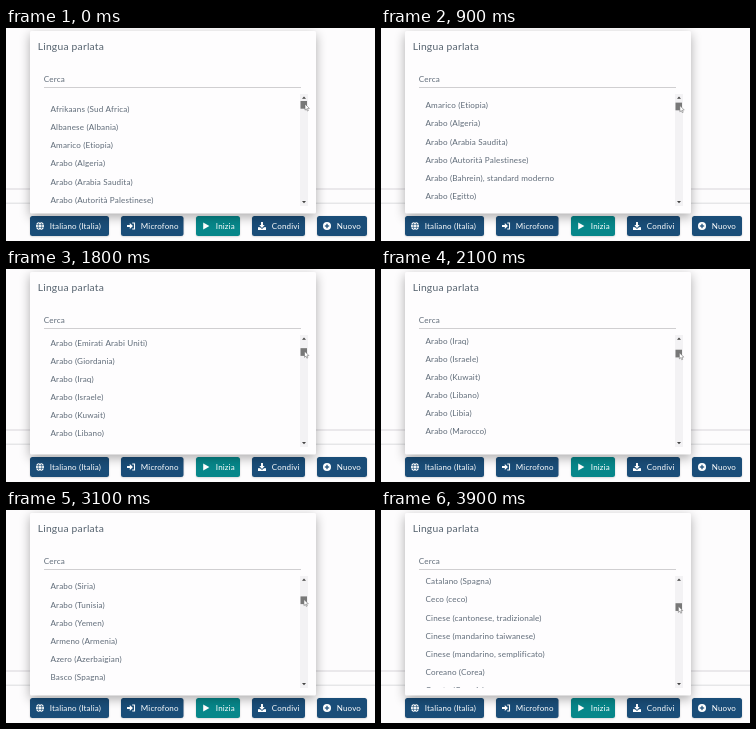
An HTML page with a canvas that plays this animation: 369 by 213 pixels, repeating every 4 s.

```html
<!DOCTYPE html>
<html lang="it">
<head>
<meta charset="utf-8">
<style>
html, body { margin: 0; width: 100%; height: 100%; overflow: hidden; background: #fdfcfd; }
canvas { display: block; }
</style>
</head>
<body>
<canvas id="stage" width="369" height="213"></canvas>
<script>
const ctx = document.getElementById('stage').getContext('2d');
const LOOP = 4000, TICK = 100;
const ROW = 18.13, THUMB_RATIO = 0.0405;
const NAVY = '#1a4d78', TEAL = '#07878a', INK = '#5f6b78';

const languages = [
  'Afrikaans (Sud Africa)', 'Albanese (Albania)', 'Amarico (Etiopia)',
  ...['Algeria', 'Arabia Saudita', 'Autorità Palestinese'].map(arabic),
  'Arabo (Bahrein), standard moderno',
  ...['Egitto', 'Emirati Arabi Uniti', 'Giordania', 'Iraq', 'Israele', 'Kuwait', 'Libano',
    'Libia', 'Marocco', 'Oman', 'Qatar', 'Siria', 'Tunisia', 'Yemen'].map(arabic),
  'Armeno (Armenia)', 'Azero (Azerbaigian)', 'Basco (Spagna)', 'Bengalese (India)',
  'Birmano (Myanmar)', 'Bulgaro (Bulgaria)', 'Catalano (Spagna)', 'Ceco (ceco)',
  'Cinese (cantonese, tradizionale)', 'Cinese (mandarino taiwanese)',
  'Cinese (mandarino, semplificato)', 'Coreano (Corea)', 'Croato (Croazia)', 'Danese (Danimarca)'
];

// List position while the thumb is dragged: [time, pixels]
const drag = [[0, 0], [300, 5], [900, 40], [1400, 101.4], [2100, 190.5],
  [2700, 252.3], [3500, 409.6], [3900, 499.2], [4000, 510]];

const buttons = [
  { x: 24, w: 79, label: 'Italiano (Italia)', icon: globe },
  { x: 115, w: 62.5, label: 'Microfono', icon: signIn },
  { x: 190, w: 44, label: 'Inizia', icon: play, color: TEAL },
  { x: 246, w: 53, label: 'Condivi', icon: download },
  { x: 311, w: 50, label: 'Nuovo', icon: plus }
];

function arabic(country) { return `Arabo (${country})`; }

function scrollAt(time) {
  const i = drag.findIndex(([t], k) => k > 0 && time <= t);
  const [t0, a] = drag[i - 1], [t1, b] = drag[i];
  return a + (b - a) * (time - t0) / (t1 - t0);
}

function text(str, x, y, size, color, spacing) {
  ctx.font = `${size}px Lato, sans-serif`;
  ctx.letterSpacing = spacing + 'px';
  ctx.fillStyle = color;
  ctx.fillText(str, x, y);
}

function rect(x, y, w, h, color) {
  ctx.fillStyle = color;
  ctx.fillRect(x, y, w, h);
}

function poly(points, color) {
  ctx.beginPath();
  points.forEach(([x, y]) => ctx.lineTo(x, y));
  ctx.closePath();
  ctx.fillStyle = color;
  ctx.fill();
}

function disc(r) {
  ctx.beginPath();
  ctx.arc(0, 0, r, 0, 7);
  ctx.fillStyle = '#fff';
  ctx.fill();
}

function roundBox(x, y, w, h, r, color, blur, offset, shade) {
  ctx.save();
  ctx.shadowColor = `rgba(0,0,0,${shade})`;
  ctx.shadowBlur = blur;
  ctx.shadowOffsetY = offset;
  ctx.beginPath();
  ctx.roundRect(x, y, w, h, r);
  ctx.fillStyle = color;
  ctx.fill();
  ctx.restore();
}

function globe(color) {
  disc(4);
  ctx.strokeStyle = color;
  ctx.lineWidth = 0.6;
  ctx.beginPath();
  ctx.ellipse(0, 0, 1.8, 4, 0, 0, 7);
  for (const y of [-1.4, 1.4]) {
    ctx.moveTo(-4, y);
    ctx.lineTo(4, y);
  }
  ctx.stroke();
}

function signIn() {
  poly([[-4, -1], [-1.2, -1], [-1.2, -3], [2, 0], [-1.2, 3], [-1.2, 1], [-4, 1]], '#fff');
  ctx.strokeStyle = '#fff';
  ctx.lineWidth = 1.1;
  ctx.beginPath();
  ctx.moveTo(1.2, -3);
  ctx.lineTo(3.5, -3);
  ctx.lineTo(3.5, 3);
  ctx.lineTo(1.2, 3);
  ctx.stroke();
}

function play() {
  poly([[-2.8, -3.6], [3.4, 0], [-2.8, 3.6]], '#fff');
}

function download(color) {
  rect(-4, 1.2, 8, 2.8, '#fff');
  poly([[-3.2, 0], [3.2, 0], [0, 3]], color);
  poly([[-1, -4], [1, -4], [1, -1], [2.7, -1], [0, 2], [-2.7, -1], [-1, -1]], '#fff');
}

function plus(color) {
  disc(4);
  rect(-2.2, -0.6, 4.4, 1.2, color);
  rect(-0.6, -2.2, 1.2, 4.4, color);
}

function drawButton({ x, w, label, icon, color = NAVY }) {
  roundBox(x, 188, w, 20, 2.5, color, 2, 0.5, 0.2);
  ctx.save();
  ctx.translate(x + 10, 198);
  icon(color);
  ctx.restore();
  text(label, x + 19.8, 201, 8, '#fff', 0.15);
}

function drawList(scroll) {
  ctx.save();
  ctx.beginPath();
  ctx.rect(24, 65.5, 270, 112.5);
  ctx.clip();
  languages.forEach((name, i) => {
    const y = 84 + i * ROW - scroll;
    if (y > 60 && y < 190) text(name, 44.5, y, 8.1, INK, 0.15);
  });
  ctx.restore();
}

function drawScrollbar(shift) {
  rect(294, 66, 8, 112, '#f3f2f4');
  poly([[296, 70.7], [300, 70.7], [298, 68.5]], '#444');
  poly([[296, 173], [300, 173], [298, 175.2]], '#444');
  rect(294.5, 73 + shift, 6.5, 7.7, '#787878');

  ctx.save();
  ctx.translate(299 - shift * 0.08, 76 + shift);
  ctx.scale(0.88, 0.88);
  poly([[0, 0], [0, 7], [1.6, 5.6], [2.7, 8], [3.8, 7.5], [2.8, 5.2], [5, 5]], '#fff');
  ctx.strokeStyle = '#666';
  ctx.lineWidth = 0.6;
  ctx.stroke();
  ctx.restore();
}

function draw(time) {
  const scroll = scrollAt(time);
  rect(0, 0, 369, 213, '#fdfcfd');
  rect(0, 160.4, 369, 1.2, '#dedde0');
  rect(0, 174.6, 369, 1.2, '#e2e1e4');
  buttons.forEach(drawButton);
  roundBox(24, 3, 286, 182.5, 1.5, '#fefdfe', 11, 3.5, 0.32);
  text('Lingua parlata', 31.7, 22.4, 10.3, '#56636f', 0.22);
  text('Cerca', 37.7, 54.3, 8.1, INK, 0.2);
  rect(38, 59, 257, 1, '#d0cfd1');
  drawList(scroll);
  drawScrollbar(scroll * THUMB_RATIO);
}

function frame(now) {
  draw(Math.floor(now % LOOP / TICK) * TICK);
  requestAnimationFrame(frame);
}
requestAnimationFrame(frame);
</script>
</body>
</html>
```
